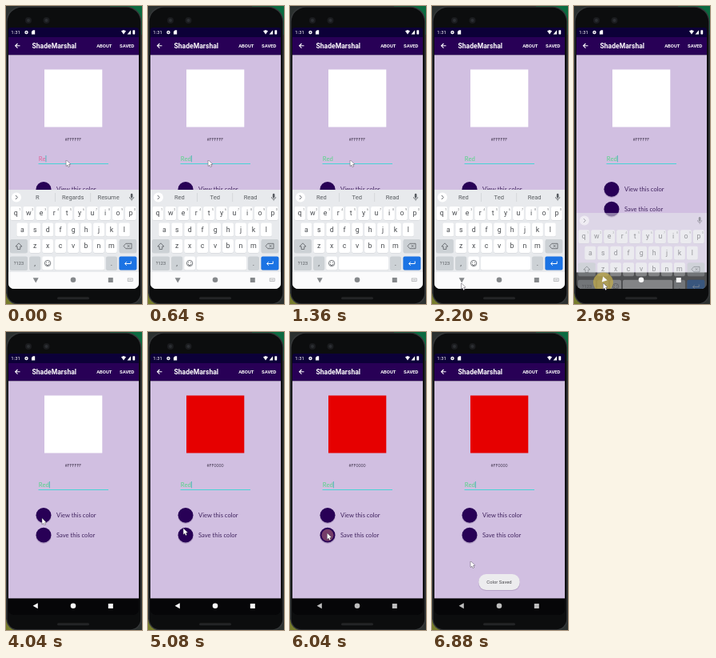
These frames come from a looping animation (170 by 373 pixels, 6920 ms). An HTML page with a canvas:

```html
<!DOCTYPE html>
<html lang="en">
<head>
<meta charset="utf-8">
<title>Color picker demo</title>
<style>
html, body { margin: 0; width: 100%; height: 100%; overflow: hidden; background: #0c0d0e; }
canvas { display: block; width: 170px; height: 373px; }
</style>
</head>
<body>
<canvas id="stage"></canvas>
<script>
const W = 170, H = 373, LOOP = 6920;
const canvas = document.getElementById('stage');
const g = canvas.getContext('2d');
const dpr = window.devicePixelRatio || 1;
canvas.width = W * dpr;
canvas.height = H * dpr;

const LILAC = '#d1bfe1', PURPLE = '#280056', STATUS = '#0c0038', TEAL = '#48d4d6';
const UI = 'Roboto, sans-serif', ROUND = 'Lato, sans-serif';

const clamp = v => Math.max(0, Math.min(1, v));
const span = (t, a, b) => clamp((t - a) / (b - a));
const ease = p => p * p * (3 - 2 * p);
const mix = (a, b, p) => a + (b - a) * p;

function rect(x, y, w, h, color) {
  g.fillStyle = color;
  g.fillRect(x, y, w, h);
}
function round(x, y, w, h, r, color) {
  g.fillStyle = color;
  g.beginPath();
  g.roundRect(x, y, w, h, r);
  g.fill();
}
function disc(x, y, r, color) {
  g.fillStyle = color;
  g.beginPath();
  g.arc(x, y, r, 0, Math.PI * 2);
  g.fill();
}
function shape(points, color) {
  g.fillStyle = color;
  g.beginPath();
  points.forEach(([x, y]) => g.lineTo(x, y));
  g.closePath();
  g.fill();
}
function line(points, color, width = 0.9) {
  g.strokeStyle = color;
  g.lineWidth = width;
  g.beginPath();
  points.forEach(([x, y]) => g.lineTo(x, y));
  g.stroke();
}
function text(s, x, y, font, color, align = 'center') {
  g.font = font;
  g.fillStyle = color;
  g.textAlign = align;
  g.textBaseline = 'alphabetic';
  g.fillText(s, x, y);
}
function faded(alpha, draw) {
  g.save();
  g.globalAlpha *= alpha;
  draw();
  g.restore();
}

function phone() {
  rect(0, 0, W, H, '#2b302f');
  rect(130, 0, 40, 36, '#0b6a40');
  rect(0, 360, 12, 13, '#777d2c');
  round(0.3, 0.5, 169.2, 373, [19, 19, 14, 14], '#36383a');
  round(1.6, 1.8, 166.6, 370.4, [18, 18, 13, 13], '#0c0d0e');
  for (const x of [28, 50.5]) {
    disc(x, 18, 4, '#1b1c1f');
    disc(x, 18, 2, '#2c2f33');
  }
  round(64, 364.3, 40, 3, 1.5, '#232426');
}

function bars() {
  rect(3, 27, 163, 12, STATUS);
  rect(3, 39, 163, 22.3, PURPLE);
  text('1:31', 6.3, 35.3, '6px ' + UI, '#fff', 'left');
  disc(25.5, 33, 2.2, '#fff');
  disc(25.5, 33, 0.8, STATUS);
  shape([[32, 32], [33.8, 30.3], [36.2, 30.3], [36.2, 35.4], [32, 35.4]], '#fff');
  shape([[144, 31.2], [147, 30], [150, 31.2], [147, 35.4]], '#fff');
  shape([[151.6, 35.4], [156, 30.2], [156, 35.4]], '#fff');
  round(158.4, 30.2, 2.8, 5.2, 0.6, '#fff');
  line([[17.5, 49.8], [11.8, 49.8]], '#fff', 1.1);
  line([[14.5, 47], [11.7, 49.8], [14.5, 52.6]], '#fff', 1.1);
  text('ShadeMarshal', 32.5, 53, 'bold 8.6px ' + UI, '#fff', 'left');
  text('ABOUT', 122.8, 52, 'bold 5.9px ' + UI, '#fff');
  text('SAVED', 151.2, 52, 'bold 5.9px ' + UI, '#fff');
}

function actionButton(y, label, t, pressed) {
  faded(0.2, () => disc(47, y + 0.8, 9.9, '#301545'));
  disc(47, y, 9.4, PURPLE);
  const p = span(t, pressed, pressed + 220);
  const out = 1 - span(t, pressed + 260, pressed + 520);
  if (p > 0 && out > 0) {
    faded(0.5 * out, () => disc(47, y, 9.4 * Math.sqrt(p), '#c47a7d'));
  }
  text(label, 63, y + 2.6, '7.6px ' + ROUND, '#41245f', 'left');
}

function content(t) {
  const red = t >= 4680;
  rect(3, 61.3, 163, 273, LILAC);
  rect(48, 79.5, 72.3, 72, red ? '#e60000' : '#fff');
  text(red ? '#FF0000' : '#FFFFFF', 84, 168.8, '5.2px ' + ROUND, '#4c4059');

  const typed = t >= 600;
  const word = typed ? 'Red' : 'Re';
  text(word, 40.8, 194.3, '7.8px ' + ROUND, typed ? '#56d588' : '#e0669a', 'left');
  if ((t + 400) % 1000 < 500) {
    rect(40.8 + g.measureText(word).width, 187, 0.8, 8.3, '#38b5b2');
  }
  rect(40.5, 197, 87.5, 1, TEAL);

  actionButton(229.3, 'View this color', t, 4560);
  actionButton(254.2, 'Save this color', t, 5900);
}

function key(cx, cy, w, label, color = '#fff', ink = '#4a4d51', size = 8.8) {
  round(cx - w / 2, cy - 8, w, 17, 2, '#cfd2d6');
  round(cx - w / 2, cy - 8.4, w, 16.8, 2, color);
  if (label) text(label, cx, cy + size * 0.32, size + 'px ' + UI, ink);
}

function keyboard(t) {
  const ink = '#585c61', gray = '#ccd1d5';
  rect(3, 230, 163, 125, '#e8eaed');
  disc(13, 239.5, 6, '#fff');
  line([[12, 237], [14.4, 239.5], [12, 242]], ink);
  if (t < 2540) {
    const words = t < 600 ? ['R', 'Regards', 'Resume'] : ['Red', 'Ted', 'Read'];
    words.forEach((w, i) => text(w, 39.3 + i * 44.4, 242.3, '7.5px ' + UI, '#585c60'));
    for (const x of [61, 105.5]) rect(x, 234, 0.6, 11, '#c9ccd0');
  }
  round(155.8, 234.8, 2.6, 5.6, 1.3, ink);
  g.strokeStyle = ink;
  g.lineWidth = 0.7;
  g.beginPath();
  g.arc(157.1, 239, 2.7, 0, Math.PI);
  g.moveTo(157.1, 241.7);
  g.lineTo(157.1, 243.8);
  g.stroke();

  [...'qwertyuiop'].forEach((c, i) => {
    const x = 12.3 + i * 15.95;
    key(x, 259.5, 13.8, c);
    text((i + 1) % 10, x + 5, 255.5, '3.6px ' + UI, '#73777b');
  });
  [...'asdfghjkl'].forEach((c, i) => key(20.3 + i * 15.95, 280, 13.8, c));
  [...'zxcvbnm'].forEach((c, i) => key(36.2 + i * 15.95, 300.5, 13.8, c));

  key(16, 300.5, 21.5, '', gray);
  line([[16, 296.8], [20, 301], [17.8, 301], [17.8, 304.5], [14.2, 304.5],
    [14.2, 301], [12, 301], [16, 296.8]], ink, 0.8);
  key(152.4, 300.5, 21.5, '', gray);
  line([[147, 300.5], [149.8, 297.3], [157, 297.3], [157, 303.7], [149.8, 303.7], [147, 300.5]], ink, 0.8);
  line([[151.5, 298.8], [154.8, 302.2]], ink, 0.7);
  line([[154.8, 298.8], [151.5, 302.2]], ink, 0.7);

  key(16, 322, 22, '?123', gray, ink, 5.8);
  key(36.2, 322, 13.8, ',', gray);
  key(52.1, 322, 13.8, '');
  g.strokeStyle = ink;
  g.lineWidth = 0.8;
  g.beginPath();
  g.arc(52.1, 322, 3.7, 0, Math.PI * 2);
  g.moveTo(54, 322.7);
  g.arc(52.1, 322.7, 1.9, 0, Math.PI);
  g.stroke();
  disc(50.7, 320.8, 0.6, ink);
  disc(53.5, 320.8, 0.6, ink);
  key(92, 322, 62, '');
  key(132, 322, 13.8, '.', gray);
  key(152.4, 322, 22, '', '#1b73e4');
  line([[156.2, 319.5], [156.2, 322.5], [148.7, 322.5]], '#fff', 1);
  line([[150.8, 320.3], [148.6, 322.5], [150.8, 324.7]], '#fff', 1);
}

function navIcons(color, turn) {
  g.save();
  g.translate(37.2, 342.8);
  g.rotate(turn);
  shape([[-3.6, 0], [2.6, -3.5], [2.6, 3.5]], color);
  g.restore();
  disc(84, 342.8, 3.3, color);
  round(127.8, 339.9, 6, 6, 0.5, color);
}

function screenBottom(t) {
  const hide = span(t, 2560, 2820);
  const open = hide === 0;
  if (!open) rect(3, 333.5, 163, 22, '#060608');
  if (hide < 1) {
    g.save();
    g.translate(0, 63 * hide);
    faded(1 - hide, () => keyboard(t));
    g.restore();
  }
  if (open) {
    rect(3, 333, 163, 22, '#fbfbfc');
    navIcons('#85888b', -Math.PI / 2);
    g.strokeStyle = '#a0a3a6';
    g.lineWidth = 0.7;
    g.strokeRect(152.2, 341, 6, 3.4);
    line([[153.5, 342.8], [157, 342.8]], '#a0a3a6', 0.7);
  } else {
    faded(0.4, () => rect(3, 333.5, 163, 22, '#060608'));
  }
  const grow = span(t, 2460, 2640);
  const fade = 1 - span(t, 2700, 3000);
  if (grow > 0 && fade > 0) {
    faded(0.75 * fade, () => disc(36.5, 346, 12.5 * grow, '#c0ab4c'));
  }
  if (!open) {
    const v = Math.round(mix(250, 190, span(t, 5700, 6000)));
    navIcons(`rgb(${v},${v},${v})`, -Math.PI / 2 * (1 - hide));
  }
}

function toast(t) {
  const p = ease(span(t, 6180, 6440));
  if (!p) return;
  faded(p, () => {
    faded(0.18, () => round(58, 304, 52, 20, 9.5, '#402055'));
    round(58.3, 303, 51.4, 20, 9.5, '#ececee');
    text('Color Saved', 84, 315.2, '5.9px ' + UI, '#4a4a4e');
  });
}

// time, x, y of the pointer tip
const PATH = [
  [0, 75.3, 193], [1460, 75.3, 193], [2120, 36.5, 347], [2840, 36.5, 347],
  [3640, 45.2, 233.3], [4740, 45.2, 233.3], [5060, 44.3, 246], [5500, 44.8, 248],
  [5760, 46.6, 252], [6160, 46.6, 252], [6520, 48.3, 287], [LOOP, 48.3, 287]
];
function pointer(t) {
  const i = PATH.findIndex((k, n) => n > 0 && t <= k[0]);
  const a = PATH[i - 1], b = PATH[i];
  const p = ease(span(t, a[0], b[0]));
  g.save();
  g.translate(mix(a[1], b[1], p), mix(a[2], b[2], p));
  const arrow = [[0, 0], [0, 7.2], [1.7, 5.7], [2.9, 8.4], [4, 7.9], [2.9, 5.3], [5.1, 5.1], [0, 0]];
  line(arrow, '#4a4552', 1);
  shape(arrow, '#fff');
  g.restore();
}

function draw(t) {
  g.setTransform(dpr, 0, 0, dpr, 0, 0);
  phone();
  g.save();
  g.beginPath();
  g.roundRect(3, 27, 163, 327, [3, 3, 7, 7]);
  g.clip();
  bars();
  content(t);
  screenBottom(t);
  toast(t);
  g.restore();
  pointer(t);
}

let start;
function tick(now) {
  start ??= now;
  draw((now - start) % LOOP);
  requestAnimationFrame(tick);
}
draw(0);
requestAnimationFrame(tick);
</script>
</body>
</html>
```
